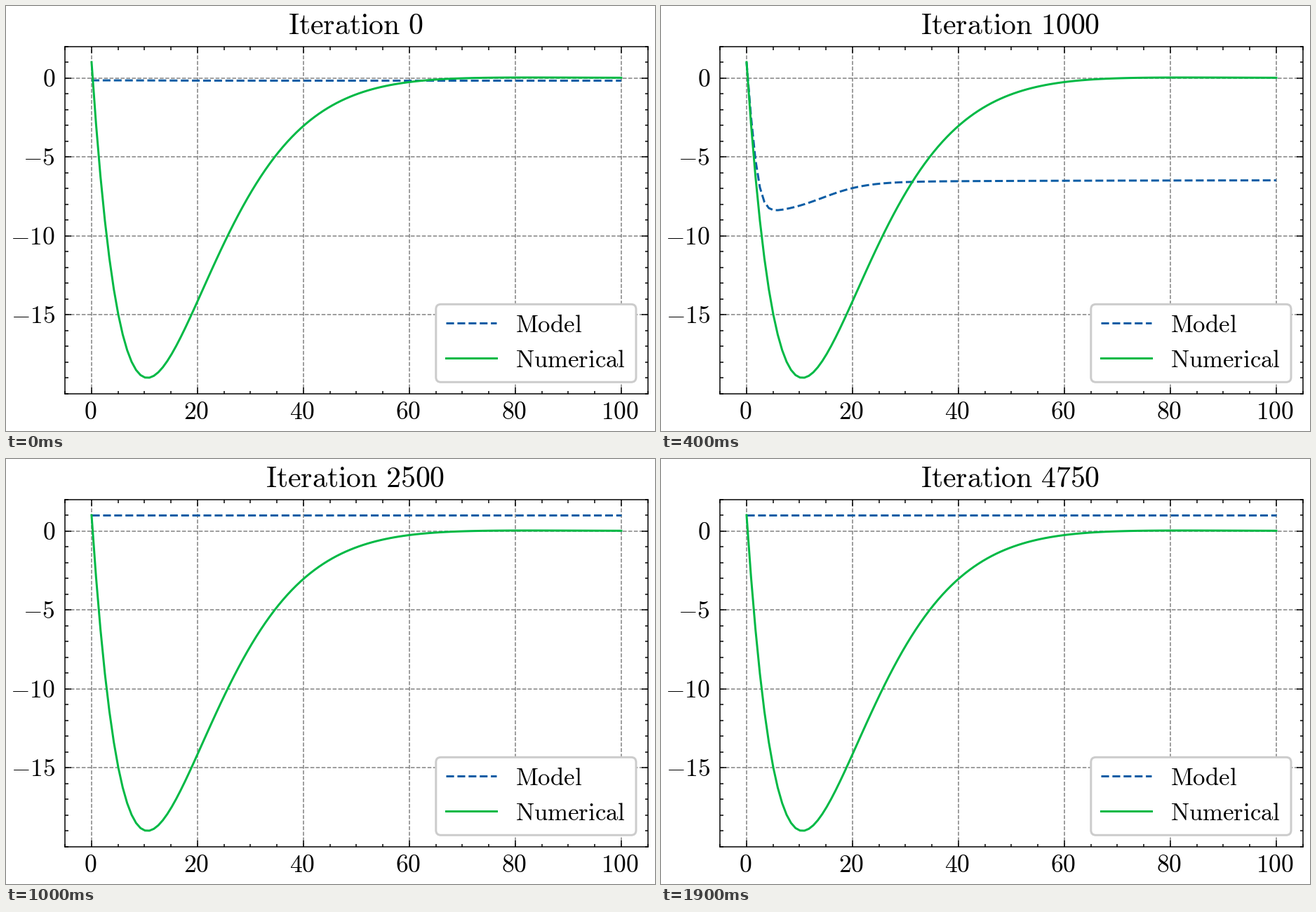
Write a matplotlib script that moves like this. It is 925 px wide and 606 px high and loops after 2 s.

```python
import numpy as np
import matplotlib.pyplot as plt
from matplotlib.animation import FuncAnimation
from matplotlib.patches import FancyBboxPatch
from matplotlib.ticker import MultipleLocator

W, H = 925, 606
LEFT, RIGHT, TOP, BOTTOM = 84.2, 914.7, 57.6, 552.8
BLUE, GREEN = "#0C5DA5", "#00B945"
FRAMES, STEP = 20, 250
COLLAPSE = 2500  # the fit falls back to a constant here

plt.rcParams["mathtext.fontset"] = "cm"

t = np.linspace(0, 100, 120)

# Shape of the fit as training goes on:
# iteration, floor, rise, rise centre, rise width, drop rate, drop bend
STAGES = np.array([
    (0, -0.15, -0.02, 14, 4, 0.9, 0.3),
    (750, -7.05, 0.1, 14, 4, 0.5, 0.14),
    (1500, -11.8, 5.95, 14.8, 4.4, 0.34, 0.038),
    (2000, -13.9, 9, 18, 5.2, 0.32, 0.026),
    (2250, -14.9, 10.4, 19.5, 5.6, 0.32, 0.021),
])


def pt(px):
    return px * 0.72


def oscillator(w0=0.1, zeta=0.9, v0=-5):
    """Damped oscillator released at 1 with speed v0."""
    decay, w = zeta * w0, w0 * np.sqrt(1 - zeta**2)
    swing = np.cos(w * t) + (v0 + decay) / w * np.sin(w * t)
    return np.exp(-decay * t) * swing


def model(it):
    """Fast drop from 1, then a sigmoid recovery with a slow tail."""
    if it >= COLLAPSE:
        return np.ones_like(t)
    floor, rise, centre, width, rate, bend = (
        np.interp(it, STAGES[:, 0], col) for col in STAGES[:, 1:].T)
    base = floor + rise / (1 + np.exp((centre - t) / width))
    tail = 0.06 * rise * t**2 / (t**2 + 50**2)
    start = 1 - base[0] if it else 0
    return base + tail + start * np.exp(-rate * t - bend * t**2)


fig = plt.figure(figsize=(W / 100, H / 100), dpi=100, facecolor="white")
ax = fig.add_axes([LEFT / W, 1 - BOTTOM / H,
                   (RIGHT - LEFT) / W, (BOTTOM - TOP) / H])
ax.set(xlim=(-5, 105), ylim=(-20, 2))
for axis, major, minor in ((ax.xaxis, 20, 5), (ax.yaxis, 5, 1)):
    axis.set_major_locator(MultipleLocator(major))
    axis.set_minor_locator(MultipleLocator(minor))
ax.set_yticks([0, -5, -10, -15])
for which, size in (("major", 9), ("minor", 4.5)):
    ax.tick_params(which=which, direction="in", top=True, right=True,
                   length=pt(size), width=pt(1.5),
                   labelbottom=False, labelleft=False)
for spine in ax.spines.values():
    spine.set_linewidth(pt(1.5))
ax.grid(True, color="black", alpha=0.5, ls="--", lw=pt(1.5))

fit, = ax.plot(t, model(0), color=BLUE, ls="--", lw=pt(3))
ax.plot(t, oscillator(), color=GREEN, lw=pt(3))

# Overlay in pixels for the text and the legend
page = fig.add_axes([0, 0, 1, 1])
page.set(xlim=(0, W), ylim=(H, 0))
page.axis("off")


def label(x, y, s, px, ha):
    return page.text(x, y, f"${s}$", fontsize=pt(px), ha=ha, va="baseline")


for v in range(0, 101, 20):
    x = LEFT + (v + 5) / 110 * (RIGHT - LEFT)
    label(x - 1.5, 589, v, 35.6, "center")
for v in range(0, -16, -5):
    y = TOP + (2 - v) / 22 * (BOTTOM - TOP)
    label(70, y + 12.2, v, 35.6, "right")

page.add_patch(FancyBboxPatch(
    (612.8, 425.3), 285.2, 111, boxstyle="round,pad=0,rounding_size=7",
    fc="white", ec="0.8", lw=pt(3)))
for y, name, color, ls in ((451.7, "Model", BLUE, "--"),
                           (501.7, "Numerical", GREEN, "-")):
    page.plot([627, 699], [y, y], color=color, ls=ls, lw=pt(3))
    label(726, y + 13.5, rf"\mathrm{{{name}}}", 34.8, "left")

title = label(498, 40, r"\ ", 41.8, "center")


def update(i):
    it = i * STEP
    fit.set_ydata(model(it))
    title.set_text(rf"$\mathrm{{Iteration\ {it}}}$")
    return fit, title


anim = FuncAnimation(fig, update, frames=FRAMES, interval=100,
                     repeat=True, repeat_delay=0)
plt.show()
```
